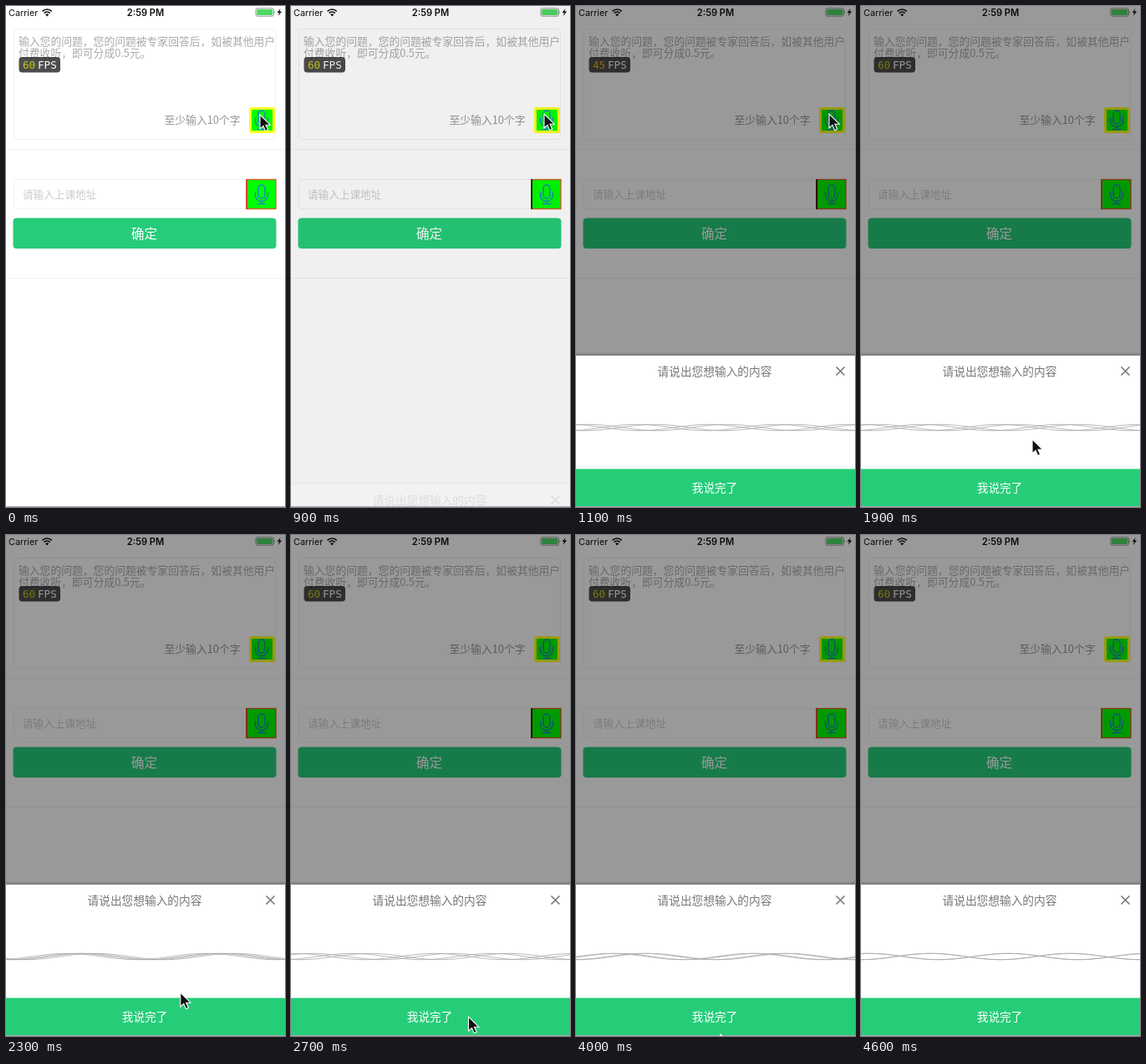
Write an HTML page that moves like this. It is 334x599 px and loops after 4.7 s.

```html
<!DOCTYPE html>
<html lang="zh">
<head>
<meta charset="utf-8">
<style>
html, body { margin: 0; width: 100%; height: 100%; overflow: hidden; background: #fff; }
svg { display: block; width: 334px; height: 599px; font-family: "Noto Sans CJK SC", "Noto Sans CJK", sans-serif; }
.status { font-family: Inter, Roboto, sans-serif; }
.mono { font: 12.6px "DejaVu Sans Mono", monospace; }
.mid { text-anchor: middle; }
.line { fill: none; stroke: #f1f1f1; }
#waves path { fill: none; stroke: #aaa; stroke-width: .8; }
</style>
</head>
<body>
<svg viewBox="0 0 334 599">
  <defs>
    <g id="mic" fill="none" stroke="#2088c0" stroke-width="1.5" stroke-linecap="round">
      <rect x="-4" y="-11" width="8" height="16" rx="4"/>
      <path d="M-7.5-2V1a7.5 7.5 0 0 0 15 0V-2M0 8.5V11.5M-4.5 11.5H4.5"/>
    </g>
    <linearGradient id="shade" x2="0" y2="1">
      <stop stop-color="#000" stop-opacity="0"/>
      <stop offset="1" stop-color="#000" stop-opacity=".22"/>
    </linearGradient>
  </defs>

  <rect width="334" height="599" fill="#fff"/>
  <path class="line" d="M0 171.5H334M0 325.5H334"/>
  <rect class="line" x="9.5" y="27.5" width="313" height="132" rx="3"/>
  <rect class="line" x="9.5" y="207.5" width="313" height="35" rx="3"/>
  <g font-size="12.8" fill="#aaa">
    <text x="15" y="46.5">输入您的问题，您的问题被专家回答后，如被其他用户</text>
    <text x="15" y="61">付费收听，即可分成0.5元。</text>
    <text x="189.5" y="141" fill="#959595">至少输入10个字</text>
    <text x="20" y="229.5" font-size="12.6" fill="#ccc">请输入上课地址</text>
  </g>
  <rect x="292.5" y="122.5" width="28" height="28" rx="1" fill="#0f0" stroke="#ff2" stroke-width="3"/>
  <use href="#mic" x="306" y="136"/>
  <rect x="288" y="207.5" width="35" height="35" fill="#0f0" stroke="#d0622b" stroke-width="1.4"/>
  <path id="edge" d="M288.2 207V243" stroke-width="1.6"/>
  <use href="#mic" x="306" y="225"/>
  <rect x="8.5" y="253.5" width="315" height="36.5" rx="4" fill="#26cc79"/>
  <text class="mid" x="165.5" y="277.6" font-size="15.5" fill="#fff">确定</text>

  <g class="status" fill="#111">
    <text x="3" y="11.7" font-size="10.8">Carrier</text>
    <text class="mid" x="167" y="11.7" font-size="11.1" font-weight="600">2:59 PM</text>
    <path d="M43.6 6.3a8 8 0 0 1 11.2 0M45.7 8.6a5 5 0 0 1 7 0" fill="none" stroke="#111" stroke-width="1.7"/>
    <path d="M49.2 12.4l-2-2.1a2.9 2.9 0 0 1 4 0z"/>
    <rect x="299" y="2.8" width="21.5" height="9.4" rx="2" fill="none" stroke="#777" stroke-width=".8"/>
    <rect x="300.2" y="4" width="19.1" height="7" rx="1" fill="#4cd964"/>
    <path d="M321.5 6v3q1.5-1.5 0-3z" fill="#777"/>
    <path d="M328.6 3l-4 5h2.4l-1.2 4 4.4-5.4h-2.6z"/>
  </g>
  <g class="mono">
    <rect x="15.5" y="61" width="49.5" height="18.5" rx="4" fill-opacity=".7"/>
    <text id="fps" x="20" y="75.2"></text>
    <text x="38" y="75.2" fill="#fff">FPS</text>
  </g>

  <rect id="dim" width="334" height="599"/>

  <g id="sheet">
    <rect y="414" width="334" height="4" fill="url(#shade)"/>
    <rect y="418" width="334" height="181" fill="#fff"/>
    <text class="mid" x="166" y="441.7" font-size="13.7" fill="#777">请说出您想输入的内容</text>
    <path d="M311.5 431.5l10 10m0-10l-10 10" stroke="#777" stroke-width="1.6"/>
    <g id="waves"></g>
    <rect y="553.5" width="334" height="46" fill="#26cd79"/>
    <text class="mid" x="166" y="580.7" font-size="13.6" fill="#fff">我说完了</text>
  </g>

  <path d="M0 598.5H334" stroke="#aaa"/>
  <path id="cursor" d="M0 0V17L4 13.4L6.7 19.6L9.7 18.3L7 12.2H12.3Z" fill="#111" stroke="#fff" stroke-width="1.1"/>
</svg>
<script>
const LOOP = 4700, STEP = 100, TAU = Math.PI * 2;
const $ = id => document.getElementById(id);
const clamp = v => Math.max(0, Math.min(1, v));
const smooth = v => v * v * (3 - 2 * v);

// time, x, y of the pointer tip
const route = [[0, 304, 130], [800, 303, 129], [1200, 303, 129], [1900, 205, 518],
  [2700, 212.5, 576], [3400, 173, 583], [4300, 173, 602]];

const waves = Array.from({ length: 4 }, () =>
  $("waves").appendChild(document.createElementNS("http://www.w3.org/2000/svg", "path")));

function pointer(t) {
  const i = route.findIndex(k => k[0] > t);
  if (i < 0) return route[route.length - 1].slice(1);
  const [a, b] = [route[i - 1], route[i]];
  const p = smooth((t - a[0]) / (b[0] - a[0]));
  return [1, 2].map(n => a[n] + (b[n] - a[n]) * p);
}

function wave(phase) {
  let d = "";
  for (let x = 0; x <= 336; x += 4)
    d += (x ? "L" : "M") + x + " " + (504 + 3.7 * Math.cos(TAU * x / 167 + phase)).toFixed(2);
  return d;
}

function draw(t) {
  const open = t < 900 ? 0 : t < 1000 ? .15 : t < 1100 ? .75 : 1;
  $("dim").setAttribute("opacity", .4 * open);
  $("sheet").setAttribute("opacity", open);
  $("sheet").setAttribute("transform", `translate(0 ${181 * (1 - open)})`);

  // a steady pair and a travelling pair of sine lines, gradually merging
  const spread = .8 * clamp((4600 - t) / 1900);
  waves.forEach((path, i) => {
    const travel = i < 2 ? 0 : TAU * (t - 3400) / 270;
    path.setAttribute("d", wave(travel + (i % 2 - .5) * spread));
  });

  const slow = t >= 1000 && t < 1900;
  $("fps").textContent = slow ? 45 : 60;
  $("fps").setAttribute("fill", slow ? "#e6b420" : "#c4c818");
  const dark = t >= 700 && t < 1300 || t >= 2500 && t < 3100;
  $("edge").setAttribute("stroke", dark ? "#220a00" : "#d0401c");
  $("cursor").setAttribute("transform", `translate(${pointer(t)})`);
}

function tick() {
  draw(Math.floor(performance.now() % LOOP / STEP) * STEP);
  requestAnimationFrame(tick);
}
tick();
</script>
</body>
</html>
```
